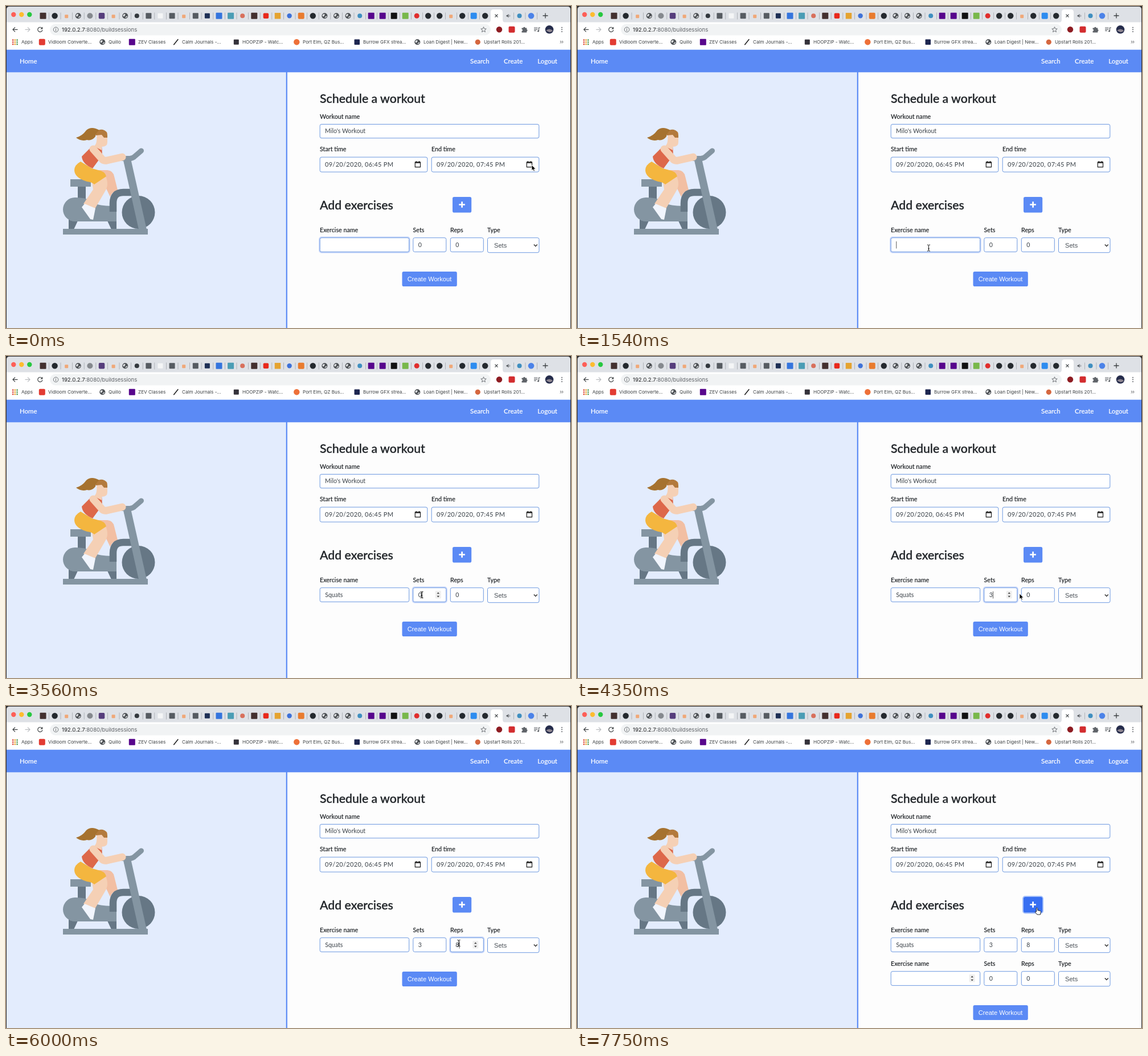
Recreate the animation shown at these times as an HTML page. Size 992x565 px, loop 8000 ms.

```html
<!DOCTYPE html>
<html lang="en">
<head>
<meta charset="utf-8">
<title>Schedule a workout</title>
<style>
  html, body { margin: 0; width: 100%; height: 100%; overflow: hidden; background: #2a2a2c; }
  svg { display: block; width: 992px; height: 565px; }
  text { white-space: pre; }
  .ui { font: 8.2px Inter, sans-serif; fill: #3c4043; }
  .url { font: 9.6px Inter, sans-serif; fill: #5f6368; }
  .nav { font: 500 11.4px Lato, sans-serif; fill: #fff; stroke: #fff; stroke-width: .15; }
  .head { font: 500 21.3px Lato, sans-serif; fill: #212529; stroke: #212529; stroke-width: .35; }
  .label { font: 500 10.7px Lato, sans-serif; fill: #212529; stroke: #212529; stroke-width: .12; }
  .value { font: 500 10.6px Lato, sans-serif; fill: #495057; }
  .date { letter-spacing: .3px; font-size: 11px; }
  .arial { font: 11.1px "Liberation Sans", Arial, sans-serif; fill: #495057; }
  .box { fill: #fff; stroke: #6c98e0; }
  .glow { fill: none; stroke: #5b8af5; }
</style>
</head>
<body>
<svg id="stage" viewBox="0 0 992 565" xmlns="http://www.w3.org/2000/svg"></svg>
<script>
const BLUE = '#5b8af5', LIGHT = '#8495a2', DARK = '#667785', SKIN = '#f5d0b5', INK = '#3c4043';

const rect = (x, y, w, h, fill, rx = 0, extra = '') =>
  `<rect x="${x}" y="${y}" width="${w}" height="${h}" rx="${rx}" fill="${fill}" ${extra}/>`;
const circle = (x, y, r, fill) => `<circle cx="${x}" cy="${y}" r="${r}" fill="${fill}"/>`;
const path = (d, fill, extra = '') => `<path d="${d}" fill="${fill}" ${extra}/>`;
const line = (d, color, width = 1.2, extra = '') =>
  `<path d="${d}" fill="none" stroke="${color}" stroke-width="${width}" ${extra}/>`;
const text = (x, y, cls, str, extra = '') => `<text x="${x}" y="${y}" class="${cls}" ${extra}>${str}</text>`;
const box = (x, y, w, h) => `<rect class="box" x="${x}" y="${y}" width="${w}" height="${h}" rx="2.8"/>`;
const square = (x, y, size, fill, rx = 1) => rect(x - size / 2, y - size / 2, size, size, fill, rx);

const globe = (x, y) => circle(x, y, 5, '#4c5054') +
  path(`M${x - 4} ${y - 1}q2 -3 4 -2q1 2 -1 3q-1 2 -2 1zM${x} ${y + 3.5}q0 -2 2 -2.5l2 -1q0 3 -4 3.5z`, '#e3e5e8');

// One letter per tab: its shape, colour and size.
const tabIcons = {
  p: (x, y) => square(x, y, 11, '#43302f'),
  g: (x, y) => circle(x, y, 5.2, '#24292e'),
  o: (x, y) => square(x, y + 1, 6, '#f0a878'),
  w: globe,
  c: (x, y) => circle(x, y, 5, '#85898e'),
  b: (x, y) => square(x, y, 10.5, '#563d7c', 2),
  k: (x, y) => circle(x, y, 4, '#33383d'),
  d: (x, y) => square(x, y, 10, '#565b61'),
  f: (x, y) => square(x, y, 9, '#f4f5f6'),
  u: (x, y) => square(x, y, 9, '#1d2f55'),
  a: (x, y) => square(x, y, 11, '#3575dd'),
  t: (x, y) => square(x, y, 11, '#4b9db5'),
  r: (x, y) => circle(x, y, 4, '#d8705c'),
  y: (x, y) => square(x, y, 9.5, '#e8291c', 2),
  m: (x, y) => square(x, y, 10.5, '#e5a32f', 0),
  l: (x, y) => circle(x, y, 4.2, '#3f72d8'),
  e: (x, y) => square(x, y, 11, '#e97b2d', 2),
  q: (x, y) => circle(x, y, 4, '#3f8fc0'),
  n: (x, y) => square(x, y, 11, '#57068c'),
  v: (x, y) => square(x, y, 11, '#111'),
  h: (x, y) => square(x, y, 11, '#78b84a'),
  i: (x, y) => circle(x, y, 4.5, '#e02d2d'),
  s: (x, y) => square(x, y, 11, '#2d8cf0', 2)
};

function tabStrip() {
  let out = path('M1 29V6Q1 1 6 1H986Q991 1 991 6V29Z', '#dee1e6');
  ['#fe5f57', '#febc2e', '#28c840'].forEach((c, i) => out += circle(13.3 + i * 14, 15, 4.2, c));
  [...'pgowcbowkdfdoduatrpymlegwwwqnnvhiggogsg'].forEach((key, i) => {
    const x = 65 + 20.6 * Math.min(i, 27) + 20 * Math.max(i - 27, 0);
    out += tabIcons[key](x, 17.3);
    if (i < 38) out += rect(x + 10, 11.5, .8, 12, '#a4a8ae');
  });
  out += path('M846 29Q851 29 851 24V11Q851 6 856 6H867Q872 6 872 11V24Q872 29 877 29Z', '#fff');
  out += line('M858.5 14.7l5 5m0 -5l-5 5', INK, 1.2);
  out += path('M878.5 16h1.7l2.3 -2v6.5l-2.3 -2h-1.7z', '#5f6368') + line('M884 15.5q1.4 1.7 0 3.5', '#5f6368', .8);
  out += rect(891, 11.5, .8, 12, '#a4a8ae') + rect(911.5, 11.5, .8, 12, '#a4a8ae') + rect(932, 11.5, .8, 12, '#a4a8ae');
  out += circle(901.5, 17.3, 4, '#3f8fc0') + circle(922, 17.3, 5.3, '#4b82e8');
  return out + line('M942.5 17h9m-4.5 -4.5v9', INK, 1.3);
}

function toolbar() {
  let out = rect(1, 28.5, 990, 48.5, '#fff') + rect(77, 31.5, 774, 20, '#f1f3f4', 10);
  out += line('M20.5 41.3h-8.5m4 -4l-4 4l4 4', INK);
  out += line('M33.500 41.3h8.5m-4 -4l4 4l-4 4', '#b9bcc0');
  out += line('M63 38.7a4.100 4.100 0 1 0 .9 3.500', INK) + path('M64.300 36.500v3.900h-3.900z', INK);
  out += line('M87.500 37.200a4.200 4.200 0 1 0 .1 0M87.500 40.800v3M87.500 38.900v1.100', '#5f6368', 1);
  out += text(98, 44.8, 'url', '<tspan fill="#202124">192.0.2.7</tspan>:8080/buildsessions');
  out += line('M838.500 36.700l1.300 3.100 3.400 .3-2.600 2.200 .8 3.300-2.900-1.800-2.900 1.800 .8-3.300-2.600-2.200 3.400-.3z', '#5f6368', .9);
  out += circle(866, 41.3, 5.2, '#8e1c22') + square(888, 41.3, 11, '#d32d2f', 2);
  out += path('M905.500 38.500h2.700a1.700 1.700 0 0 1 3.400 0h2.700v2.700a1.700 1.700 0 0 1 0 3.300v2h-8.800v-2.600a1.600 1.600 0 0 0 0 -3.200z', '#5f6368');
  out += line('M927 38h6.500m-6.500 2.700h6.500m-6.500 2.700h4M935.500 44v-6h2.500', '#5f6368', 1.2) + circle(934.5, 44, 1.6, '#5f6368');
  out += circle(954, 41.3, 7.3, '#252c4b') + path('M948 43q6 -5 12 0q-2 3 -6 3z', '#8d8590');
  for (let i = -1; i < 2; i++) out += circle(976, 41.3 + i * 3.6, 1, '#5f6368');

  const dots = ['#dc4a3d', '#e8a22c', '#4f9a5b', '#4b7ed8'];
  for (let i = 0; i < 9; i++)
    out += rect(11 + i % 3 * 3.7, 58.5 + Math.floor(i / 3) * 3.7, 2.4, 2.4, dots[(i + Math.floor(i / 3)) % 4]);
  const bookmarks = [
    [27, 'Apps'],
    [74, 'Vidloom Converte...', (x, y) => square(x, y, 11, '#e23b32', 2)],
    [180, 'Quillo', globe],
    [232, 'ZEV Classes', tabIcons.n],
    [309, 'Calm Journals -...', (x, y) => line(`M${x - 4} ${y + 5}l8 -10`, '#222', 1.6)],
    [415, 'HOOPZIP - Watc...', (x, y) => square(x, y, 9, '#34323a')],
    [521, 'Port Elm, QZ Bus...', (x, y) => circle(x, y, 5.2, '#ee7038')],
    [627, 'Burrow GFX strea...', (x, y) => square(x, y, 9.5, '#1d2650')],
    [733, 'Loan Digest | New...', globe],
    [839, 'Upstart Rolls 201...', (x, y) => circle(x, y, 4.6, '#d5673f')]
  ];
  for (const [x, name, icon] of bookmarks)
    out += (icon ? icon(x - 10.7, 63.3) : '') + text(x, 66.2, 'ui', name);
  return out + line('M973 61l2 2.200-2 2.200m3 -4.400l2 2.200-2 2.200', INK, .9);
}

function rider() {
  return rect(126, 316, 14, 26, DARK) + rect(113, 304, 36, 13, LIGHT) +
    path('M110 375H127L119 392H110ZM177 375H194V392H185Z', DARK) +
    path('M121 336Q145 336 158 347Q166 351 194 351V378H121A21 21 0 0 1 121 336Z', LIGHT) +
    path('M162 288H178Q188 289 190 299L196 323Q186 326 183 335L172 312Z', '#f2bfa3') +
    line('M188 361V346Q188 327 206 327H224', DARK, 12.500) +
    circle(232.5, 362, 29, DARK) +
    path('M206 271L219 268L247 392H233Z', LIGHT) +
    rect(100, 391, 149, 10, LIGHT) +
    line('M205 267.500H217Q223 267.500 227 263L237.500 254', LIGHT, 9, 'stroke-linecap="round"') +
    path('M150 303L174 296Q182 313 174 325L156 356L136 347L153 322Z', SKIN) +
    path('M138 347L157 355L153 375L148 374L133 353Z', '#f1f5fd') +
    path('M131 273L151 285L162 288Q174 290 176 299L155 313Q151 309 142 308Q120 301 120 288Q120 279 131 273Z', '#f4b63f') +
    path('M150 247L133 264Q134 277 152 285L169 262L168 244Z', '#dd684a') +
    path('M159 222H178V239Q178 247 168 247V253L154 246Q161 243 159 222Z', SKIN) +
    path('M158 227V222Q162 216 170 217Q178 219 178 227V231H172L168 226Z', '#b37a3c') +
    path('M123 231Q134 228 141 218Q150 210 164 218Q158 222 157 229Q151 237 142 235Q132 238 123 231Z', '#a6722f') +
    line('M153 251L169 269Q171 272 177 271L204 265', SKIN, 13, 'stroke-linejoin="round" stroke-linecap="round"');
}

const spinner = x => rect(x - 5, 412, 10, 13.5, '#efefef', 1) +
  path(`M${x - 2.3} 417.300l2.300 -2.800 2.300 2.800zM${x - 2.3} 420.700l2.300 2.800 2.300 -2.800z`, '#454545');

function field(id, x, w, value) {
  return `<rect class="glow" id="${id}Glow" x="${x - .7}" y="406" width="${w + 1.4}" height="26.400" rx="3.500" stroke-width="2.800"/>` +
    box(x, 406.7, w, 24.7) +
    (id === 'name' ? '' : `<g id="${id}Spin">${spinner(x + w - 14)}</g>`) +
    text(x + 9, 423, 'value', value, `id="${id}"`) +
    rect(x + 9, 413, .8, 12.5, '#333', 0, `id="${id}Caret"`);
}

function row(suffix) {
  const label = (x, str) => text(x, 397.3, 'label', str);
  return label(551, 'Exercise name') + label(714.5, 'Sets') + label(780, 'Reps') + label(845, 'Type') +
    field('name' + suffix, 551.2, 156.5, '') + field('sets' + suffix, 714.8, 58, '0') + field('reps' + suffix, 780.3, 58, '0') +
    box(845.5, 406.7, 90.5, 26) + text(857, 424, 'arial', 'Sets') +
    line('M926.800 418.500l3 3 3 -3', '#333', 1.5);
}

function dateField(x, label, value) {
  const c = x + 167.3;
  return text(x, 255.3, 'label', label) + box(x + .2, 265.2, 188.6, 26) + text(x + 9, 282, 'value date', value) +
    line(`M${c} 274.200h9.200v8.500h-9.200zM${c + 2} 272v2m5.200 -2v2`, '#1c1c1c', 1.2) + rect(c, 273.5, 9.2, 2.2, '#1c1c1c');
}

const cursors = {
  arrow: path('M0 0V9.600L2.200 7.600L3.700 11L5.300 10.300L3.900 7H6.900Z', '#000', 'stroke="#fff" stroke-width=".7"'),
  beam: line('M-2.500 -5.500Q0 -5.500 0 -4Q0 -5.500 2.500 -5.500M0 -4V4M-2.500 5.500Q0 5.500 0 4Q0 5.500 2.500 5.500M-1.300 1.500H1.300', '#111', 1),
  hand: path('M-1 0Q.5 -1 1.200 .5V4L6 5Q7 5.500 6.800 7L6 11.500H.5L-3 7.300Q-3 5.500 -1 6.500Z', '#fff', 'stroke="#111" stroke-width=".9"')
};

document.getElementById('stage').innerHTML =
  tabStrip() + toolbar() +
  rect(1, 77, 990, 488, '#fdfdfd') + rect(1, 116, 491, 449, '#e3ecfd') + rect(491.7, 116, 2.2, 449, BLUE) +
  rect(1, 76.7, 990, 39.6, BLUE) +
  text(24, 101.4, 'nav', 'Home') + text(815, 101.4, 'nav', 'Search') +
  text(874, 101.4, 'nav', 'Create') + text(968, 101.4, 'nav', 'Logout', 'text-anchor="end"') +
  rider() +
  text(551, 169.6, 'head', 'Schedule a workout') +
  text(551, 197.5, 'label', 'Workout name') + box(551.2, 207.5, 384.6, 24.3) + text(560, 223.2, 'value', "Milo's Workout") +
  dateField(551, 'Start time', '09/20/2020, 06:45 PM') + dateField(747, 'End time', '09/20/2020, 07:45 PM') +
  text(551, 356.8, 'head', 'Add exercises') +
  rect(783, 334, 35, 29.5, 'none', 4, `id="ring" stroke="#a9c3fb" stroke-width="2.200"`) +
  rect(784, 335, 33.2, 27.5, BLUE, 2.8, 'id="plus"') + line('M795.300 348.500h10.600m-5.300 -5.300v10.600', '#fff', 2.7) +
  row('') + `<g id="secondRow" transform="translate(0 59)">${row('2')}</g>` +
  `<g id="submit">${rect(695.5, 466, 96.3, 26, BLUE, 2.8)}${text(743.5, 483, 'arial', 'Create Workout', 'text-anchor="middle" style="fill:#fff"')}</g>` +
  '<g id="cursor">' + Object.keys(cursors).map(k => `<g id="${k}">${cursors[k]}</g>`).join('') + '</g>';

const $ = id => document.getElementById(id);
const show = (id, on) => $(id).style.display = on ? '' : 'none';
const within = (t, ...spans) => spans.some(([a, b]) => t >= a && t < b);
const held = (keys, t) => keys.filter(k => k[0] <= t).pop();

const cursorKeys = [
  [0, 'arrow', 923, 279], [190, 'arrow', 925, 279], [380, 'arrow', 927, 280], [570, 'arrow', 927, 281],
  [770, 'arrow', 908, 290], [860, 'arrow', 835, 333], [960, 'arrow', 729, 386], [1050, 'beam', 645, 419],
  [1150, 'beam', 617.5, 424.5], [1820, 'beam', 657, 424], [1920, ''],
  [2780, 'beam', 802, 414], [2980, 'beam', 796, 413], [3080, 'arrow', 774, 413], [3170, 'beam', 749, 416],
  [3270, 'beam', 735, 418], [3370, 'beam', 730, 419], [3750, ''],
  [4350, 'arrow', 777, 417], [4440, 'beam', 790, 417], [4530, 'beam', 795, 416],
  [6390, 'beam', 808, 410], [6480, 'arrow', 829, 396], [6580, 'arrow', 837.5, 386], [6780, 'arrow', 837.5, 385],
  [7070, 'arrow', 828, 376], [7160, 'hand', 812, 360], [7250, 'hand', 807.5, 354.5]
];
const glowKeys = {
  name: [[0, 1], [190, .5], [280, 0], [1450, .5], [1540, 1], [3460, .5], [3560, 0]],
  sets: [[0, 0], [3460, .5], [3560, 1], [5120, .5], [5220, 0]],
  reps: [[0, 0], [5120, .5], [5220, 1], [6780, .5], [6880, 0]]
};
const valueKeys = {
  name: [[0, ''], [1920, 'S'], [2120, 'Sq'], [2310, 'Squ'], [2400, 'Squa'], [2500, 'Squat'], [2690, 'Squats']],
  sets: [[0, '0'], [3750, ''], [3850, '3']],
  reps: [[0, '0'], [5610, ''], [6000, '8']]
};
const caretSpans = {
  name: [[1540, 3270]],
  sets: [[3560, 4440], [4830, 5120]],
  reps: [[5220, 6480]]
};
const spinSpans = {
  sets: [[3170, 5120]],
  reps: [[2780, 3080], [4440, 6780]]
};

for (const id of ['name2', 'sets2', 'reps2']) {
  show(id + 'Glow', false);
  show(id + 'Caret', false);
  if (id !== 'name2') show(id + 'Spin', false);
}

function render(t) {
  for (const id in valueKeys) {
    const label = $(id), value = held(valueKeys[id], t)[1];
    if (label.textContent !== value) label.textContent = value;
    $(id + 'Glow').style.opacity = held(glowKeys[id], t)[1] * .32;
    show(id + 'Caret', within(t, ...caretSpans[id]));
    const width = value ? label.getComputedTextLength() : 0;
    $(id + 'Caret').setAttribute('x', +label.getAttribute('x') + width + .2);
    if (spinSpans[id]) show(id + 'Spin', within(t, ...spinSpans[id]));
  }

  const [, kind, x = 0, y = 0] = held(cursorKeys, t);
  for (const k in cursors) show(k, k === kind);
  $('cursor').setAttribute('transform', `translate(${x} ${y})`);

  const added = t >= 7750;
  show('secondRow', added);
  show('ring', added);
  $('submit').setAttribute('transform', `translate(0 ${added ? 59 : 0})`);
  $('plus').setAttribute('fill', t >= 7160 ? '#376ff2' : BLUE);
}

const start = performance.now();
function tick() {
  render((performance.now() - start) % 8000);
  requestAnimationFrame(tick);
}
tick();
</script>
</body>
</html>
```
